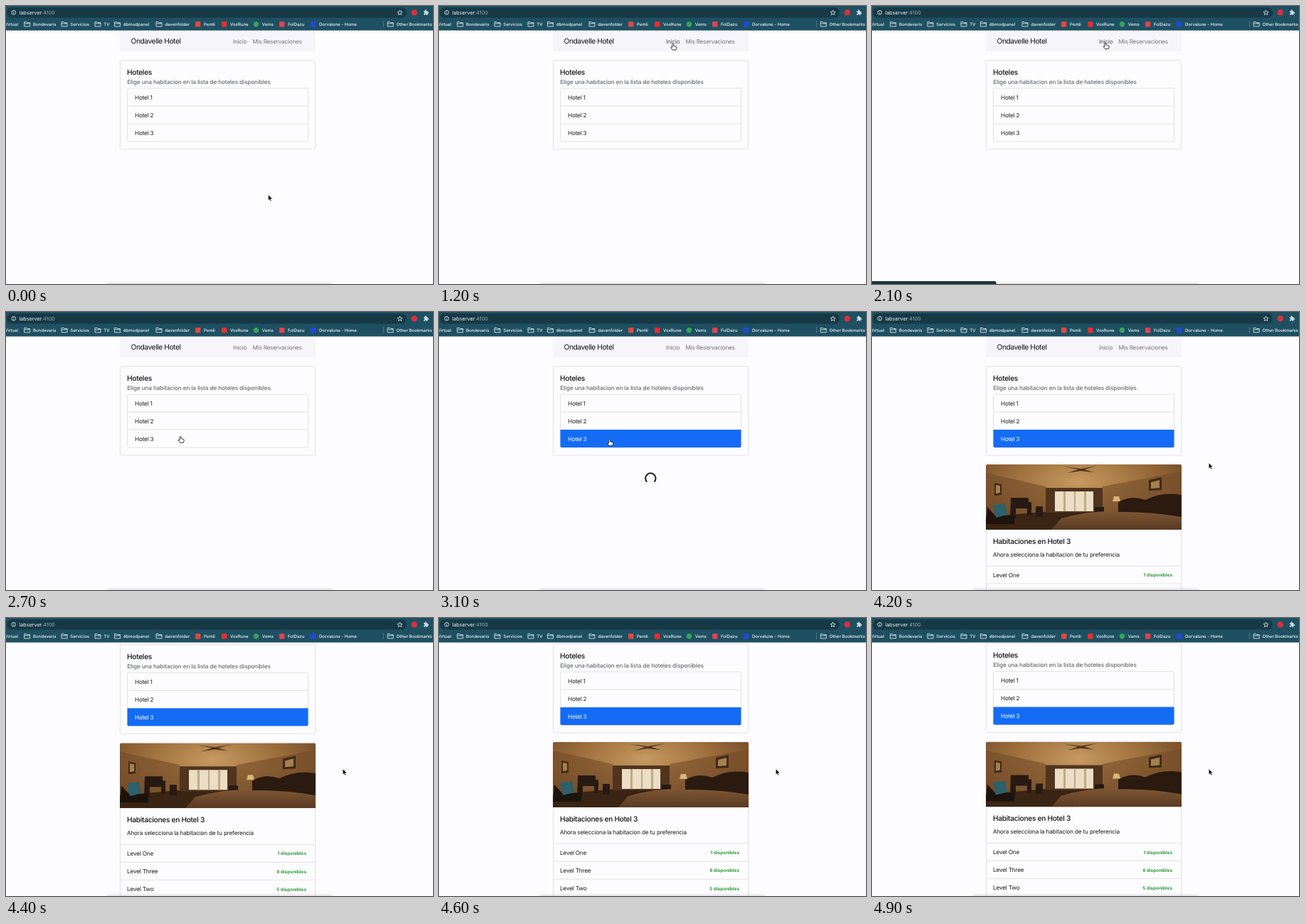
An HTML page for the animation above (5 s loop, 600x392 px).

```html
<!DOCTYPE html>
<html lang="es">
<head>
<meta charset="utf-8">
<title>Hoteles</title>
<style>
html, body { margin: 0; height: 100%; overflow: hidden; background: #fdfcfe; }
svg { display: block; width: 100vw; height: 100vh; }
text {
  font: 400 8.16px Inter, "Open Sans", sans-serif;
  letter-spacing: -.02em;
  text-rendering: geometricPrecision;
  fill: #1b1d21;
}
.brand, .title { font-size: 10.2px; letter-spacing: -.03em; fill: #111215; }
.brand { letter-spacing: -.04em; }
.title, .sub { font-weight: 500; }
.sub { fill: #666c73; letter-spacing: -.012em; }
.link { fill: #737277; letter-spacing: -.025em; }
.link.hover { fill: #4b4a4f; }
.badge { font-size: 6.4px; font-weight: 700; letter-spacing: 0; fill: #2f9a3a; text-anchor: end; }
.mark { font-size: 6.05px; font-weight: 500; letter-spacing: 0; fill: #f4f8f9; }
.url { font-size: 7.2px; letter-spacing: 0; fill: #f1f5f6; }
.line { fill: none; stroke: #e2e1e5; }
.icon { fill: none; stroke: #d5dfe3; stroke-width: .9; stroke-linejoin: round; }
</style>
</head>
<body>
<svg viewBox="0 0 600 392">
  <defs>
    <radialGradient id="wall" gradientUnits="userSpaceOnUse" cx="0" cy="0" r="1" gradientTransform="translate(130 24) scale(165 75)">
      <stop offset="0" stop-color="#c69a62"/>
      <stop offset=".45" stop-color="#a57742"/>
      <stop offset="1" stop-color="#744b27"/>
    </radialGradient>
    <linearGradient id="bed" x2="0" y2="1">
      <stop offset="0" stop-color="#7d5735"/>
      <stop offset="1" stop-color="#593a21"/>
    </linearGradient>
    <filter id="soft" x="-10%" y="-200%" width="120%" height="500%"><feGaussianBlur stdDeviation="2"/></filter>
    <clipPath id="frame"><path d="M0 92V2Q0 0 2 0H273Q275 0 275 2V92Z"/></clipPath>
  </defs>

  <g id="page">
    <path fill="#f6f5fa" d="M160 34H435V64H160Z"/>
    <text class="brand" x="175.5" y="53.2">Ondavelle Hotel</text>
    <text class="link" id="home" x="319" y="52.6">Inicio</text>
    <text class="link" x="346.5" y="52.6">Mis Reservaciones</text>

    <rect class="line" x="160.5" y="76.5" width="274" height="125.5" rx="2"/>
    <text class="title" x="170" y="96.7">Hoteles</text>
    <text class="sub" x="170.3" y="109.7">Elige una habitacion en la lista de hoteles disponibles</text>
    <rect class="line" x="170.5" y="116" width="254" height="75" rx="2"/>
    <path class="line" d="M170 141H425M170 166H425"/>
    <path id="active" fill="#146cf5" d="M170.5 166H424.5V189Q424.5 191 422.5 191H172.5Q170.5 191 170.5 189Z"/>
    <g id="hotels"></g>

    <circle id="spinner" cx="297.3" cy="234.5" r="7.2" fill="none" stroke="#24282b" stroke-width="2.1"
      pathLength="8" stroke-dasharray="6 2" stroke-dashoffset="-1"/>

    <g id="rooms">
      <rect class="line" x="160.5" y="215" width="274" height="300" rx="2"/>
      <g transform="translate(160 215)" clip-path="url(#frame)">
        <path fill="url(#wall)" d="M0 0H275V92H0Z"/>
        <path fill="#744b28" opacity=".6" d="M0 12L84 31V78H0ZM275 10L164 31V70H275Z"/>
        <path fill="#3a2414" d="M0 74L90 66H160L130 92H0Z"/>
        <path fill="#50341d" d="M84 33H164V68H84Z"/>
        <path fill="#ebddc6" d="M97 38H151V66H97Z"/>
        <path fill="#c0a988" d="M109 38H112V66H109ZM124 38H126V66H124ZM138 38H141V66H138Z"/>
        <path fill="#3f2a19" d="M12 26L22 28V43L12 44ZM229 22L247 18V36L229 37Z"/>
        <path fill="#a5804e" d="M14 29L20 30V40L14 41ZM232 25L244 22V33L232 34Z"/>
        <path fill="#271a12" d="M35 47H60V53H64V72H58V62H42V76H34ZM70 59H80V74H70ZM153 60H166V69H153Z"/>
        <path fill="#1c130d" d="M2 60L13 72H40V84H0Z"/>
        <path fill="#2c606a" d="M10 57L27 55L30 71L14 75Z"/>
        <path fill="#4a301b" d="M108 3L134 6L157 2L138 7L152 11L133 9L114 12L130 7Z"/>
        <path fill="url(#bed)" d="M106 76Q150 64 186 66L275 70V92H92Z"/>
        <path fill="#2a1a10" d="M186 53Q205 43 224 50Q248 38 275 43V74Q230 66 186 67Z"/>
        <path fill="#d9b67a" d="M180 45H187L189 52H178Z"/>
      </g>
      <text class="title" x="170" y="327">Habitaciones en Hotel 3</text>
      <text x="170" y="344.7">Ahora selecciona la habitacion de tu preferencia</text>
      <g id="levels"></g>
    </g>
  </g>

  <rect x="142" y="391" width="316" height="6" fill="#000" opacity=".16" filter="url(#soft)"/>
  <path id="status" fill="#19323f" d="M0 388H172Q174.5 388 174.5 390.5V392H0Z"/>

  <path fill="#1e5062" d="M0 0H600V34.5H0Z"/>
  <rect x="1" y="2" width="562" height="14.5" rx="7.2" fill="#173946"/>
  <circle class="icon" cx="10.8" cy="9.2" r="2.9"/>
  <path class="icon" d="M10.8 8.8V10.9M10.8 7.2V8"/>
  <text class="url" x="18.5" y="11.8">labserver<tspan fill="#98adb5">:4100</tspan></text>
  <path class="icon" d="M553.5 5.9L554.5 8.2 557 8.4 555.1 10.1 555.7 12.5 553.5 11.2 551.3 12.5 551.9 10.1 550 8.4 552.5 8.2Z"/>
  <circle cx="573.7" cy="9.2" r="4.2" fill="#dc2f3c"/>
  <path fill="#c9dce3" d="M587 7H588.7Q588.3 5.3 589.7 5.3T590.7 7H592.5V8.9Q594.2 8.5 594.2 9.8T592.5 10.7V12.8H590.7Q590.7 11.4 589.6 11.4T588.6 12.8H587V10.7Q588.4 10.7 588.4 9.7T587 8.8Z"/>
  <path stroke="#4b7685" d="M530.5 21V30"/>
  <g id="marks"></g>

  <path id="arrow" d="M0 0V8.3L1.9 6.5 3.2 9.3 4.6 8.7 3.4 6H5.9Z" stroke="#fff" stroke-width=".6"/>
  <path id="hand" d="M-1 1Q0 -.5 1 1V3.4L4.5 4.2Q5.4 4.6 5 6.6L4.2 9H-.5L-3 5.7Q-2.9 4.3 -1 5.7Z" fill="#fff" stroke="#222" stroke-width=".9"/>
</svg>
<script>
const el = id => document.getElementById(id);
const label = (x, y, s, cls = '') => `<text class="${cls}" x="${x}" y="${y}">${s}</text>`;

// Bookmarks: text position, text, icon colour and corner radius (no colour means a folder)
const marks = [
  [-2, 'Virtual'], [38, 'Bondevaris'], [90.3, 'Servicios'], [137.3, 'TV'],
  [164.8, 'dbmodpanel'], [223.3, 'davenfolder'],
  [278, 'Pemli', '#e2473b', 1], [315, 'VoxRune', '#ee2a2a', 1], [359.7, 'Vems', '#35a35a', 4],
  [396, 'FolDazu', '#e5404f', 1], [440, 'Dorvalune - Home', '#1f49d8', 1],
  [548.5, 'Other Bookmarks']
];
el('marks').innerHTML = marks.map(([x, s, color, r]) =>
  (color
    ? `<rect x="${x - 12}" y="22" width="7.4" height="7.4" rx="${r}" fill="${color}"/>`
    : `<path class="icon" d="M${x - 12.3} 22.3h3l1 1.2h4v5.3h-8zm0 2.5h8"/>`) +
  label(x, 27.6, s, 'mark')).join('');

el('hotels').innerHTML = [1, 2, 3].map(n => label(181, 106.7 + 25 * n, 'Hotel ' + n)).join('');
const third = el('hotels').lastChild;

el('levels').innerHTML = [['One', 1], ['Three', 8], ['Two', 5]].map(([name, free], i) => {
  const y = 358 + 25.1 * i;
  return `<path class="line" d="M160 ${y}H435"/>` +
    label(170, y + 15.7, 'Level ' + name) +
    label(422, y + 15.3, free + ' disponibles', 'badge');
}).join('');

const LOOP = 5000, STEP = 100;
const CLICK = 2900, LOADED = 3400;
const path = [
  [0, 368.5, 266], [600, 368.5, 266], [1100, 328.7, 53], [1500, 328.7, 53], [1800, 328, 51.5],
  [2200, 328, 51.5], [2400, 275, 152], [2800, 239.5, 179.5], [3400, 239.5, 179.5], [4100, 473.2, 212.7]
];
const scroll = [[4200, 0], [4300, 22], [4400, 38.8], [4600, 40], [4900, 40.6]];

const smooth = k => k * k * (3 - 2 * k);

// Value of a key list at time t, one number per column
function at(keys, t, ease) {
  const i = keys.findIndex(k => k[0] > t);
  if (i < 0) return keys[keys.length - 1].slice(1);
  if (i === 0) return keys[0].slice(1);
  const a = keys[i - 1], b = keys[i], k = ease((t - a[0]) / (b[0] - a[0]));
  return a.slice(1).map((v, c) => v + (b[c + 1] - v) * k);
}

const show = (id, on) => el(id).setAttribute('display', on ? 'inline' : 'none');
const move = (id, x, y) => el(id).setAttribute('transform', `translate(${x} ${y})`);

function draw(t) {
  const [x, y] = at(path, t, smooth);
  const [top] = at(scroll, t, k => k);
  const onHome = x > 318 && x < 339 && y > 44 && y < 58;
  const onList = x > 170 && x < 425 && y > 116 && y < 191;
  const picked = t >= CLICK;

  move('page', 0, -top);
  el('home').classList.toggle('hover', onHome);
  show('active', picked);
  third.style.fill = picked ? '#fff' : '';
  show('spinner', picked && t < LOADED);
  el('spinner').setAttribute('transform', `rotate(${90 + (t - 3100) * 360 / 750} 297.3 234.5)`);
  show('rooms', t >= LOADED);
  show('status', t >= 1400 && t < 2500);

  const hand = onHome || onList;
  show('hand', hand);
  show('arrow', !hand);
  move(hand ? 'hand' : 'arrow', x, y);
}

const start = performance.now();
function tick() {
  const t = (performance.now() - start) % LOOP;
  draw(Math.floor(t / STEP) * STEP);
  requestAnimationFrame(tick);
}
tick();
</script>
</body>
</html>
```
